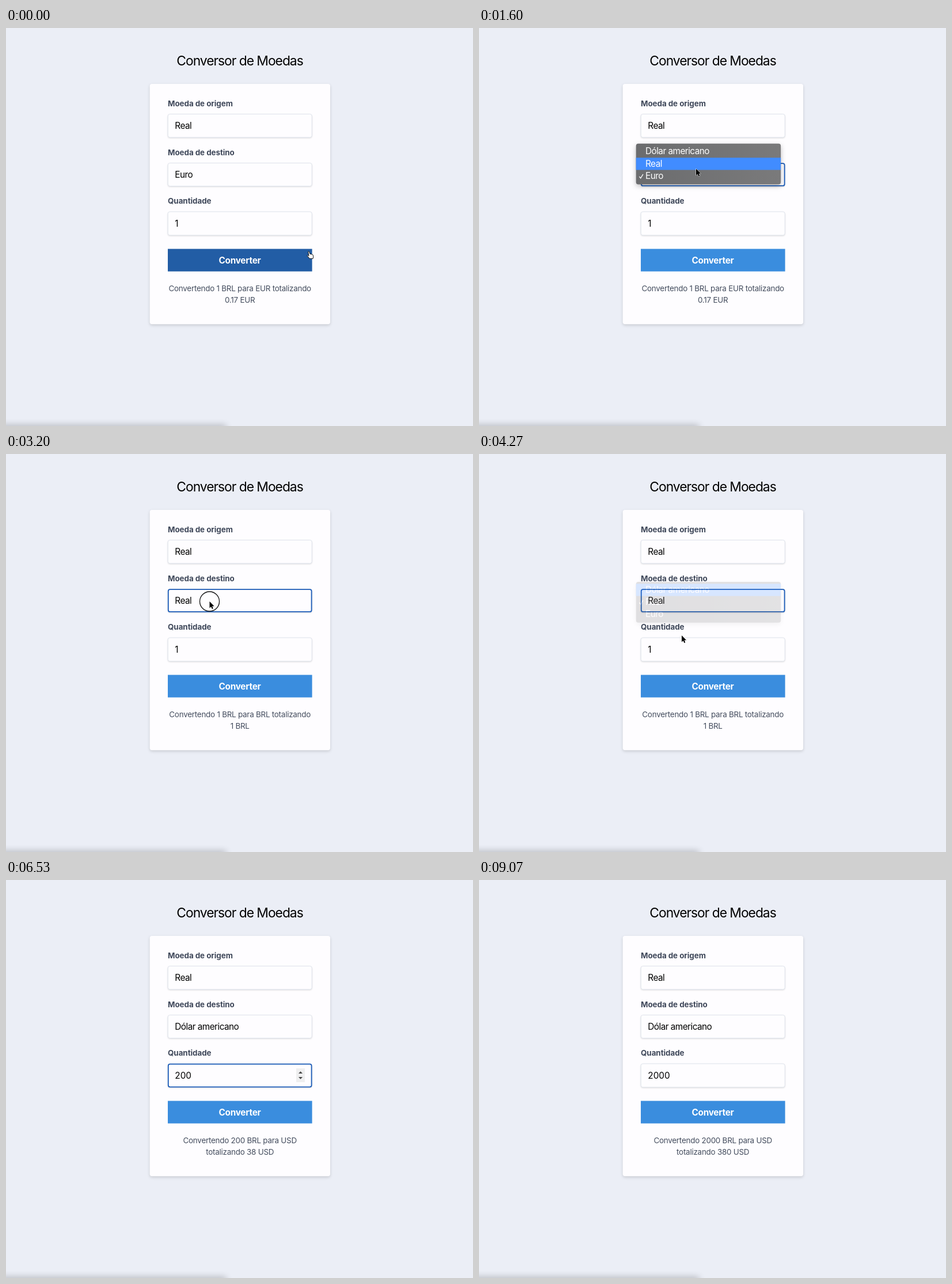
These frames come from a looping animation (811 px wide and 691 px high, 9790 ms). An HTML page:

```html
<!DOCTYPE html>
<html lang="pt">
<head>
<meta charset="utf-8">
<title>Conversor de Moedas</title>
<style>
  html, body { margin: 0; width: 100%; height: 100%; overflow: hidden; background: #ebeef6; }
  svg { display: block; width: 811px; height: 691px; }
  text { font-family: Inter, Roboto, "Open Sans", sans-serif; font-optical-sizing: none; white-space: pre; }
  .title { font-size: 22.8px; letter-spacing: -.044em; text-anchor: middle; }
  .label { font-size: 13.4px; font-weight: 700; letter-spacing: -.004em; fill: #3f485a; }
  .value, .item { font-size: 15.3px; letter-spacing: -.034em; }
  .number { font-size: 15.3px; }
  .item { fill: #fff; }
  .go { font-size: 15.3px; font-weight: 700; letter-spacing: -.017em; fill: #fff; text-anchor: middle; }
  .result { font-size: 13.4px; letter-spacing: -.017em; fill: #434c5d; text-anchor: middle; }
  .key { font-size: 24px; fill: #fff; text-anchor: middle; }
  .field { fill: #fefdff; stroke: #dfe4ec; filter: drop-shadow(0 1px 1.2px rgba(0, 0, 0, .13)); }
  .focus { fill: none; stroke: #1c5cb8; stroke-width: 1.8; }
  .card { fill: #fefdff; filter: drop-shadow(0 2px 2.5px rgba(0, 0, 0, .15)); }
  .menu { filter: drop-shadow(0 3px 4px rgba(0, 0, 0, .25)); }
</style>
</head>
<body>
<svg viewBox="0 0 811 691">
  <defs>
    <linearGradient id="grey"><stop stop-color="#6b6c6e"/><stop offset="1" stop-color="#7a7a7b"/></linearGradient>
    <filter id="soft" x="-20%" y="-100%" width="140%" height="300%"><feGaussianBlur stdDeviation="6"/></filter>
  </defs>
  <rect width="811" height="691" fill="#ebeef6"/>
  <rect x="-40" y="689" width="422" height="40" fill="#000" opacity=".22" filter="url(#soft)"/>

  <text class="title" x="406" y="65.2">Conversor de Moedas</text>
  <rect class="card" x="249.7" y="97" width="313.3" height="417.3" rx="4"/>
  <text class="label" x="281" y="135.6">Moeda de origem</text>
  <text class="label" x="281" y="220.7">Moeda de destino</text>
  <text class="label" x="281" y="305.2">Quantidade</text>
  <rect class="field" x="281.2" y="149.5" width="250" height="40.4" rx="3.5"/>
  <rect class="field" x="281.2" y="234.5" width="250" height="40" rx="3.5"/>
  <rect class="field" x="281.2" y="319" width="250" height="40.8" rx="3.5"/>
  <rect class="focus" id="focus" x="281.8" width="248.8" rx="3"/>
  <text class="value" x="293.3" y="174.8">Real</text>
  <text class="value" id="target" x="293.3" y="259.8"></text>
  <text class="number" id="amount" x="293.3" y="344.6"></text>
  <rect id="caret" y="330" width="1.2" height="18"/>
  <g id="spinner">
    <rect x="504" y="327" width="15" height="24" fill="#efeff0"/>
    <path d="M508 336l3.5-3.8 3.5 3.8zM508 342l3.5 3.8 3.5-3.8z" fill="#454545"/>
  </g>
  <rect id="button" x="281" y="383.5" width="250.6" height="39.1"/>
  <text class="go" x="406" y="408.6">Converter</text>
  <text class="result" id="line1" x="406.2" y="457.2"></text>
  <text class="result" id="line2" x="406.2" y="477.4"></text>

  <g id="menu">
    <rect class="menu" x="272.7" y="200.8" width="251.4" height="70.6" rx="4" fill="url(#grey)"/>
    <rect id="bar" x="272.7" width="251.4" height="21.2" fill="#418cff"/>
    <text class="item" x="289" y="219.4">Dólar americano</text>
    <text class="item" x="289" y="240.6">Real</text>
    <text class="item" x="289" y="261.7">Euro</text>
    <path id="check" d="M278.4 0l2.3 3 4.2-7" fill="none" stroke="#fff" stroke-width="1.3"/>
  </g>

  <g id="keycap">
    <rect id="cap" y="566" height="43" rx="7" fill="#000" opacity=".65"/>
    <text class="key" id="key" x="405" y="595"></text>
    <path id="erase" d="M392 587l7-8h19v16h-19zM403 583.5l7 7m0-7l-7 7" fill="none" stroke="#fff" stroke-width="1.8"/>
  </g>

  <circle id="ring" r="17" fill="#fff" fill-opacity=".25" stroke="#111" stroke-width="1.3"/>
  <g id="cursor">
    <path id="arrow" d="M0 0V11.4L2.6 9 4.4 13 6.3 12.2 4.6 8.3H8.1Z" fill="#000" stroke="#fff" stroke-width="1" paint-order="stroke"/>
    <path id="hand" d="M-1.4 .4q1.2-1.2 2.2.4l1.3 3.8q1-.8 1.9.2 1-.5 1.7.5 1.2-.3 1.5 1l.5 3.2-.6 2.8H1.2L-2.8 7.6q-.3-1.4 1.3-1l1.5 1.1z" fill="#fff" stroke="#111" stroke-width="1"/>
    <path id="beam" d="M-2.5-7Q0-7 0-5Q0-7 2.5-7M0-5V6M-2.5 8Q0 8 0 6Q0 8 2.5 8" fill="none" stroke="#111" stroke-width="1.1"/>
  </g>
</svg>
<script>
const LOOP = 9790, FPS = 15;
const $ = id => document.getElementById(id);
const set = (id, attrs) => { for (const k in attrs) $(id).setAttribute(k, attrs[k]); };
const show = (id, on) => { $(id).style.display = on ? "" : "none"; };
const within = (t, spans) => spans.some(([a, b]) => t >= a && t < b);

// Last row whose time has been reached
const last = (table, t) => table.reduce((row, next) => next[0] <= t ? next : row);

// time, x, y, shape
const path = [
  [0, 526, 388, "hand"], [70, 524, 378, "arrow"], [130, 523, 373, "arrow"],
  [260, 523, 373, "arrow"], [600, 468, 318, "arrow"], [930, 384, 260, "arrow"],
  [1200, 380, 256, "arrow"], [1600, 377, 244.5, "arrow"], [2200, 352, 241, "arrow"],
  [2530, 346.5, 239.5, "arrow"], [2800, 347, 241, "arrow"], [3130, 353.5, 256, "arrow"],
  [3400, 353.5, 256, "arrow"], [3600, 354, 240, "arrow"], [3730, 354, 236, "arrow"],
  [4070, 353, 237, "arrow"], [4270, 352, 315, "arrow"], [4400, 352, 332, "beam"],
  [4470, 352, 338, "beam"], [5000, 352, 338, ""], [8130, 352, 338, "beam"],
  [8200, 420, 365, "arrow"], [8470, 714, 438, "arrow"], [9070, 714, 438, ""]
];
const clicks = [[1070, 1270], [2600, 2730], [3130, 3270], [3870, 4000], [4530, 4800], [8530, 9070]];

// time, opacity, y offset, highlighted row, checked row
const menus = [
  [0, 0, 0, 2, 2], [1270, 1, 0, 2, 2], [1530, 1, 0, 1, 2], [2670, 1, 0, -1, 2],
  [2730, 1, 0, 1, 2], [2800, .6, 0, 1, 2], [2870, .2, 0, 1, 2], [2930, 0, 0, 1, 2],
  [3270, 1, 21.3, 1, 1], [3600, 1, 21.3, 0, 1], [4000, 1, 21.3, -1, 1],
  [4070, 1, 21.3, 0, 1], [4200, .6, 21.3, 0, 1], [4270, .2, 21.3, 0, 1], [4330, 0, 0, 0, 0]
];
const targets = [[0, "Euro", "EUR", .17], [2930, "Real", "BRL", 1], [4330, "Dólar americano", "USD", .19]];
const amounts = [[0, "1"], [5000, ""], [5730, "2"], [5870, "20"], [6070, "200"], [7870, "2000"]];
const keys = [[0, ""], [5000, "erase"], [5530, ""], [5730, "2"], [5870, "0"], [6530, ""], [7870, "0"], [8330, ""]];
const focuses = [[0, ""], [1270, "target"], [4600, "amount"], [8530, ""]];
const carets = [[4600, 6530], [7000, 7530], [7870, 8330]];

function pointer(t) {
  const row = last(path, t), next = path[path.indexOf(row) + 1] || row;
  const p = next === row ? 0 : (t - row[0]) / (next[0] - row[0]);
  return [row[1] + (next[1] - row[1]) * p, row[2] + (next[2] - row[2]) * p, row[3]];
}

function drawForm(t) {
  const [, name, code, rate] = last(targets, t);
  const amount = last(amounts, t)[1], focus = last(focuses, t)[1];
  $("target").textContent = name;
  $("amount").textContent = amount;

  const shown = amount || "1";
  const total = +(shown * rate).toFixed(2) + " " + code;
  const head = `Convertendo ${shown} BRL para ${code}`;
  const wraps = code === "USD";
  $("line1").textContent = wraps ? head : head + " totalizando";
  $("line2").textContent = wraps ? "totalizando " + total : total;

  show("focus", focus);
  set("focus", focus === "amount" ? { y: 319.7, height: 39.6 } : { y: 235.1, height: 38.8 });
  show("spinner", within(t, [[4400, 8530]]));
  show("caret", within(t, carets));
  set("caret", { x: 293.3 + (amount === "1" ? 7.5 : amount.length * 9.55) });
  set("button", { fill: t < 70 ? "#225da5" : "#3a8dde" });
}

function drawMenu(t) {
  const [, alpha, dy, row, checked] = last(menus, t);
  show("menu", alpha > 0);
  set("menu", { opacity: alpha, transform: `translate(0 ${dy})` });
  show("bar", row >= 0);
  set("bar", { y: 204 + Math.max(row, 0) * 21.2 });
  set("check", { transform: `translate(0 ${215.5 + checked * 21.2})` });
}

function drawKey(t) {
  const key = last(keys, t)[1], erase = key === "erase";
  const width = erase ? 74 : 52;
  show("keycap", key);
  show("erase", erase);
  $("key").textContent = erase ? "" : key;
  set("cap", { x: 405 - width / 2, width });
}

function drawPointer(t) {
  const [x, y, shape] = pointer(t);
  for (const id of ["arrow", "hand", "beam"]) show(id, id === shape);
  set("cursor", { transform: `translate(${x} ${y})` });
  show("ring", within(t, clicks));
  set("ring", { cx: x, cy: y });
}

const start = performance.now();
function frame() {
  const now = (performance.now() - start) % LOOP;
  const step = Math.floor((now + 4) * FPS / 1000);
  const t = Math.round(step * 100 / FPS) * 10;
  drawForm(t);
  drawMenu(t);
  drawKey(t);
  drawPointer(t);
  requestAnimationFrame(frame);
}
frame();
</script>
</body>
</html>
```
